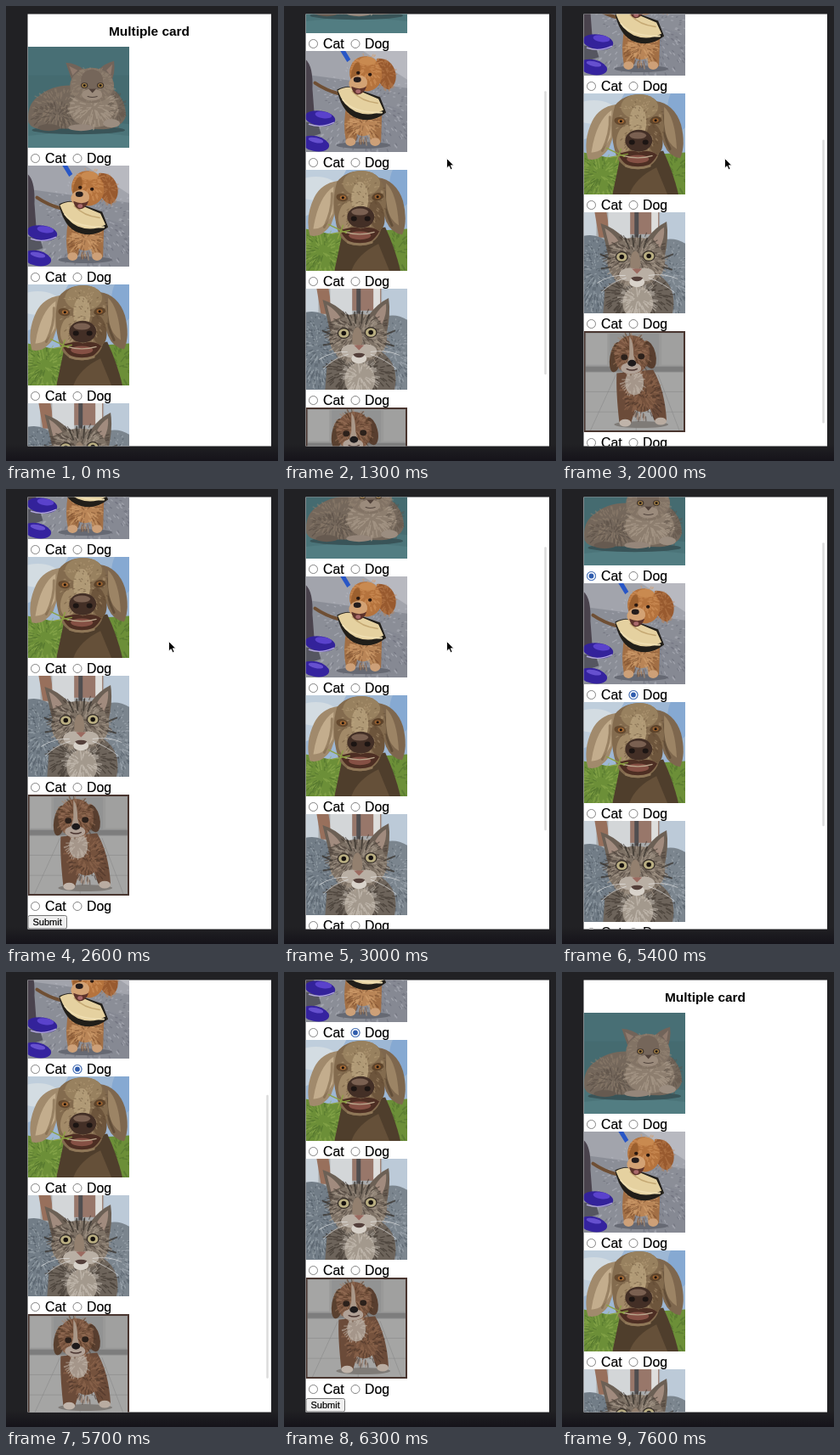
Recreate the animation shown at these times as an HTML page. Size 320x536 px, loop 8200 ms.

```html
<!DOCTYPE html>
<html lang="en">
<head>
<meta charset="utf-8">
<title>Multiple card</title>
<style>
html, body { margin: 0; width: 100%; height: 100%; overflow: hidden; background: #212124; }
svg { display: block; }
text { font-family: "Liberation Sans", Arial, sans-serif; font-size: 15.8px; fill: #000; stroke: #000; stroke-width: .2px; }
</style>
</head>
<body>
<svg id="stage" width="320" height="536" viewBox="0 0 320 536"></svg>
<script>
let seed = 7;
const rnd = () => (seed = (seed * 16807) % 2147483647) / 2147483647;

const E = (x, y, rx, ry, fill, turn = 0) =>
  `<ellipse cx="${x}" cy="${y}" rx="${rx}" ry="${ry}" fill="${fill}" transform="rotate(${turn} ${x} ${y})"/>`;
const P = (d, fill) => `<path d="${d}" fill="${fill}"/>`;
const L = (d, color, w = 1, o = 1) =>
  `<path d="${d}" fill="none" stroke="${color}" stroke-width="${w}" stroke-linecap="round" opacity="${o}"/>`;
const R = (x, y, w, h, fill) => `<rect x="${x}" y="${y}" width="${w}" height="${h}" fill="${fill}"/>`;

// Short strokes pointing away from the middle of an ellipse
function fur(cx, cy, rx, ry, n, len, color, o = .5) {
  let d = "";
  for (let i = 0; i < n; i++) {
    const a = rnd() * Math.PI * 2, r = Math.sqrt(rnd());
    const x = cx + Math.cos(a) * r * rx, y = cy + Math.sin(a) * r * ry;
    d += `M${x.toFixed(1)} ${y.toFixed(1)}l${(Math.cos(a) * len).toFixed(1)} ${(Math.sin(a) * len + 1).toFixed(1)}`;
  }
  return L(d, color, 1.3, o);
}
const eye = (x, y, r, iris, pupil) => E(x, y, r, r * .85, iris) + E(x, y, pupil, pupil, "#17120f");

const photos = [
  () => // long-haired cat on teal
    R(0, 0, 120, 120, "#456b70") + R(0, 0, 120, 34, "#486f75") +
    P("M0 90Q60 84 120 92V120H0Z", "#4b7479") + P("M0 106Q60 98 120 106V120H0Z", "#527d82") +
    E(60, 99, 55, 5, "#395458") +
    P("M1 90Q-2 68 14 58Q28 46 50 46L100 50Q116 62 116 82Q112 97 90 98L24 97Q6 100 1 90Z", "#74675b") +
    fur(38, 72, 34, 20, 130, 4, "#918171") + fur(36, 82, 32, 14, 90, 4, "#50463f") +
    E(78, 74, 29, 22, "#8d7e6f") + fur(78, 72, 27, 22, 130, 5, "#b0a08f", .6) + fur(106, 74, 8, 18, 40, 4, "#5d5147") +
    P("M53 42L45 19Q58 20 66 27H84Q91 20 102 17Q104 32 98 43Z", "#72645a") +
    P("M53 34L49 23L59 28ZM93 28L100 21L98 34Z", "#8f7a6d") +
    E(76, 46, 26, 21, "#827365") + fur(76, 45, 26, 20, 120, 3, "#9a8a79") +
    E(76, 40, 13, 13, "#75665a") + E(76, 57, 12, 7, "#9b8b7c") +
    E(67, 46, 4.2, 3.4, "#3f342d") + E(86, 46, 4.2, 3.4, "#3f342d") +
    eye(67, 46, 3, "#a07d45", 1.5) + eye(86, 46, 3, "#a07d45", 1.5) +
    P("M72 50h9l-4.500 5z", "#4f4039") + L("M71 59q5 2 11 0", "#51443d", 1.2) +
    E(63, 96, 15, 4, "#95867a") + E(99, 91, 10, 5, "#9b8d80") + E(25, 96, 13, 4, "#665a50"),

  () => // golden puppy with a cream scarf
    R(0, 0, 120, 120, "#8b8e97") + P("M0 0H120V44L0 28Z", "#a2a4ac") + P("M68 0H120V34Z", "#b8b9c0") +
    P("M90 62L120 72V120H70Z", "#868993") + fur(70, 70, 60, 55, 150, 2, "#bdbfc7", .45) +
    fur(70, 80, 60, 42, 120, 2, "#5f636f", .45) +
    P("M0 10Q9 18 8 45L10 72L0 76Z", "#4a434d") + P("M0 84L15 88L18 98L0 104Z", "#555660") +
    E(17, 80, 18, 9, "#33229a", 8) + E(21, 76, 10, 4, "#5a42cc", 8) + L("M4 87Q18 92 33 85", "#b4a8e0", 1.4) +
    E(11, 110, 17, 9, "#35239f", 12) + E(12, 106, 9, 3, "#6650cf", 12) +
    P("M41 0H47L53 10L49 13Z", "#2856c6") +
    L("M11 38Q24 47 40 51", "#6f4f34", 4) +
    E(68, 112, 32, 4, "#666973") +
    P("M49 60Q43 88 48 109Q54 114 59 107L63 90L74 91L77 109Q84 115 89 108L90 76L84 58Z", "#a26f45") +
    E(68, 82, 16, 19, "#b98557") + fur(68, 86, 18, 22, 100, 4, "#dbab78") + fur(68, 88, 18, 20, 50, 4, "#714526") +
    E(53, 108, 6, 5, "#cda078") + E(82, 108, 6, 5, "#cda078") +
    P("M37 46Q48 40 58 44L88 55L95 73Q76 88 56 78Q42 70 37 46Z", "#211e19") +
    P("M38 47Q50 40 60 46L86 57L92 70Q76 79 59 72Q44 65 38 47Z", "#e5d1a0") +
    L("M44 58Q56 74 90 73", "#f0dfb3", 2) + L("M55 48Q66 60 85 62", "#c4a873", 1.5) +
    P("M84 9Q101 8 106 25Q109 39 98 46Q87 43 82 26Z", "#985a2f") + fur(96, 28, 8, 16, 40, 4, "#be8050") +
    E(71, 27, 19, 21, "#b5733d", -18) + fur(73, 22, 17, 18, 100, 3, "#d89a62") +
    E(59, 26, 5, 13, "#9c602f", 12) + E(62, 38, 11, 9, "#d3a274", -14) + E(73, 12, 10, 5, "#c98a50") +
    E(62, 26, 2.2, 2, "#271710") + E(76, 28, 2.2, 2, "#271710") +
    E(61, 34, 4.5, 3.2, "#241c1c") + P("M54 42Q64 47 72 42Q69 51 61 52Q55 50 54 42Z", "#5d332b") +
    E(62, 48, 3, 2.4, "#a9696b"),

  () => // grey hound over grass
    R(0, 0, 120, 120, "#9db7d4") + P("M0 0H48L26 42L0 55Z", "#bfcedc") + E(12, 22, 26, 14, "#d3dce2") +
    E(113, 18, 14, 26, "#86a9d2") + P("M0 70L28 76L120 70V120H0Z", "#6c8f38") +
    fur(20, 98, 25, 24, 100, 5, "#93b152") + fur(108, 98, 14, 24, 50, 5, "#4a6a2a") + fur(22, 98, 26, 24, 60, 5, "#476829") +
    P("M34 120L43 77L94 68Q106 94 112 120Z", "#4f3e2c") + P("M54 120Q61 100 86 88L99 120Z", "#655039") +
    P("M38 13Q18 16 10 33Q-1 56 5 78Q18 82 30 65L40 36Z", "#a18a6c") +
    P("M33 20Q15 32 9 70Q22 71 32 52Z", "#c3ad8d") + L("M31 28Q32 48 22 68", "#7b6448", 3, .6) +
    P("M85 9Q107 12 115 37Q121 61 114 77Q101 75 95 61L85 30Z", "#7e674e") +
    P("M95 16Q108 28 110 66Q100 60 95 44Z", "#9c8465") + L("M93 26Q93 48 102 66", "#513f2c", 3, .6) +
    P("M37 14Q50-2 74 2Q92 7 94 29Q97 48 90 66Q87 87 66 90Q44 91 38 72Q29 42 37 14Z", "#836b4e") +
    E(66, 16, 22, 15, "#98815f") + E(49, 54, 10, 17, "#a28a68", 12) + E(84, 54, 9, 18, "#6d553c", -10) +
    E(64, 34, 10, 20, "#b09a76") + fur(65, 39, 27, 35, 90, 2, "#c0a982", .4) + fur(70, 42, 26, 38, 60, 2, "#5a452f", .4) +
    E(43, 33, 7, 4.5, "#64492f", 12) + E(85, 32, 7, 4.5, "#5c432b", -12) +
    E(44, 33, 3.6, 2.5, "#a96c35") + E(85, 32, 3.6, 2.5, "#9a612f") + E(44, 33, 1.6, 1.6, "#17120f") + E(85, 32, 1.6, 1.6, "#17120f") +
    E(65, 56, 16, 13, "#432f26") + E(64, 50, 10, 4, "#7a6051") + E(57, 58, 3.5, 3, "#1c1513") + E(73, 58, 3.5, 3, "#1c1513") +
    P("M41 72Q57 66 65 70Q78 66 87 73Q79 88 64 89Q47 87 41 72Z", "#4d2e23") +
    E(64, 78, 13, 5, "#855044") + L("M47 74Q64 79 81 74", "#b9a58b", 1.2) + L("M50 86Q64 91 78 86", "#8f7758", 3) +
    L("M27 65L48 75M31 76L52 72M38 82L44 66", "#8ca143", 1.4),

  () => // tabby on a blue-grey couch
    R(0, 0, 120, 120, "#a9acae") + R(0, 0, 15, 32, "#c9d2da") + P("M13 0H27L32 30H18Z", "#98705c") +
    R(29, 0, 26, 40, "#d3d6d8") + R(55, 0, 34, 26, "#98776a") + R(60, 0, 5, 30, "#504e50") +
    R(80, 0, 8, 30, "#dededc") + R(90, 0, 30, 55, "#bccad8") +
    P("M0 28Q18 24 32 39L42 120H0Z", "#727d87") + P("M88 36Q103 27 120 37V120H85Z", "#7b858e") +
    fur(13, 74, 19, 43, 130, 2, "#a3adb5", .6) + fur(106, 79, 16, 42, 110, 2, "#a5aeb6", .6) +
    fur(14, 74, 19, 43, 130, 2, "#4b5560", .6) + fur(106, 79, 16, 42, 80, 2, "#525c66", .6) +
    P("M25 92Q35 75 90 75Q111 90 105 120H23Z", "#6d645b") + fur(64, 99, 40, 22, 150, 5, "#3c342d", .6) +
    E(64, 108, 18, 20, "#a3998d") + fur(64, 104, 20, 18, 80, 5, "#d8d0c6") +
    P("M29 51L20 13Q36 18 48 31H75Q84 18 98 11Q101 30 95 56Z", "#6c6055") +
    P("M30 39L25 19Q35 25 41 34ZM82 32Q88 22 95 18Q96 31 90 42Z", "#a18b7e") +
    E(62, 59, 34, 29, "#7d7165") + fur(62, 59, 34, 29, 200, 4, "#afa293", .6) + fur(62, 52, 36, 27, 130, 4, "#433a32", .6) +
    L("M49 31L54 43M58 28L59 41M67 28L66 41M75 31L71 42M31 55L20 50M32 65L21 67M93 55L105 50M94 65L104 68", "#342e29", 2, .7) +
    E(61, 60, 6, 14, "#93806f") + E(54, 74, 12, 8, "#b9afa4") + E(72, 74, 12, 8, "#b9afa4") + E(63, 83, 9, 6, "#d8d2ca") +
    E(45, 53, 7.5, 6.5, "#332c27") + E(77, 52, 7.5, 6.5, "#332c27") +
    eye(45, 53, 6.2, "#b9ae82", 2.8) + eye(77, 52, 6.2, "#b9ae82", 2.8) +
    P("M57 67H69L63 73Z", "#9b6a60") + P("M56 78Q63 75 70 78Q68 82 63 82Q58 82 56 78Z", "#54403b") +
    L("M49 75Q31 74 16 84M50 78Q34 82 21 95M77 75Q95 72 111 79M77 78Q94 84 107 95", "#eee", .8, .75),

  () => // small brown and white puppy on tiles
    R(0, 0, 120, 120, "#8c8c8c") + R(2, 2, 116, 45, "#999998") + R(3, 3, 25, 37, "#a5a5a4") +
    R(31, 3, 58, 38, "#929393") + R(92, 3, 25, 37, "#a0a09f") + R(2, 42, 116, 6, "#7d7d7d") +
    P("M2 49H118V118H2Z", "#a5a5a4") +
    L("M2 72H118M2 96H118M38 52L8 118M62 52V118M88 52L113 118", "#898a89", 1, .6) +
    E(68, 111, 32, 4, "#7f7b77") +
    P("M39 50Q38 72 42 108Q48 114 56 109L61 92L78 91L84 107Q92 112 98 107Q96 70 82 46Z", "#6b4b39") +
    E(69, 72, 18, 24, "#75523d") + fur(68, 74, 22, 27, 130, 4, "#976f54") + fur(72, 82, 20, 22, 70, 4, "#412d23") +
    E(60, 61, 11, 15, "#a5968a") + fur(58, 60, 12, 13, 50, 4, "#cabfb4") +
    E(49, 109, 7, 4.5, "#c0b4aa") + E(91, 107, 7, 4.5, "#b9aca1") +
    E(38, 31, 7, 18, "#59402f", 10) + E(77, 28, 8, 17, "#583e2f", -14) +
    E(57, 28, 21, 23, "#795540") + fur(57, 26, 21, 22, 120, 4, "#a37d60") + fur(57, 26, 21, 22, 60, 4, "#48301f") +
    P("M54 6Q59 12 59 29L63 43Q58 49 50 43L54 28Z", "#a99788") + E(56, 44, 12, 7, "#b0a196") +
    E(48, 31, 4, 3.5, "#2c211b") + E(68, 30, 4, 3.5, "#2c211b") +
    E(57, 38, 5, 4, "#1d1a1b") + L("M51 45Q57 48 63 45", "#4a3530", 1.5) +
    `<rect x="1" y="1" width="118" height="118" fill="none" stroke="#49352f" stroke-width="2"/>`
];

function radio(name, x, y) {
  return `<circle cx="${x}" cy="${y}" r="5" fill="#fff" stroke="#767676" stroke-width=".9"/>
    <g id="${name}" visibility="hidden"><circle cx="${x}" cy="${y}" r="5" fill="#fff" stroke="#4a75bd" stroke-width="1.1"/>
    <circle cx="${x}" cy="${y}" r="2.900" fill="#2f5cad"/></g>`;
}

function card(photo, i) {
  const y = 48 + i * 140;
  return `<svg x="25.500" y="${y}" width="119.500" height="119" viewBox="0 0 120 120" preserveAspectRatio="none">
    <g filter="url(#soft)">${photo()}</g></svg>
    ${radio("cat" + i, 34.5, y + 131.5)}<text x="46" y="${y + 136.6}">Cat</text>
    ${radio("dog" + i, 84, y + 131.5)}<text x="95" y="${y + 136.6}">Dog</text>`;
}

const $ = id => document.getElementById(id);
$("stage").innerHTML = `
  <defs>
    <clipPath id="page"><rect x="25.500" y="9.500" width="286.500" height="509"/></clipPath>
    <filter id="soft" x="0" y="0" width="1" height="1"><feGaussianBlur stdDeviation=".8"/></filter>
    <linearGradient id="base" x2="0" y2="1"><stop stop-color="#212124"/><stop offset="1" stop-color="#15131a"/></linearGradient>
  </defs>
  ${R(0, 0, 320, 536, "#212124")}${R(0, 516, 320, 20, "url(#base)")}
  ${R(25.5, 9.5, 286.5, 509, "#fff")}
  <g clip-path="url(#page)">
    <g id="scroll">
      <text x="168.500" y="34.500" text-anchor="middle" style="font-weight:bold;font-size:15.400px;stroke:none">Multiple card</text>
      ${photos.map(card).join("")}
      <rect x="26" y="750.500" width="45.500" height="15.500" rx="2" fill="#efefef" stroke="#767676"/>
      <text x="31.500" y="762" style="font-size:11px">Submit</text>
    </g>
    <rect id="bar" x="306.300" width="2.500" height="334" rx="1.200" fill="#dcdcdc"/>
    <path id="cursor" d="M0 0V11.500L2.700 9L4.600 13.200L6.500 12.300L4.700 8.300H8.200Z" fill="#000" stroke="#fff" stroke-width=".8"/>
  </g>`;

// Keys are [time, value]
const scrollKeys = [[900, 0], [1000, 8], [1100, 40], [1300, 135], [1400, 162], [1600, 182], [1700, 182],
  [1800, 190], [2000, 225], [2300, 248], [2600, 248], [2700, 236], [2900, 130], [3100, 40], [3300, 6],
  [3500, 0], [5200, 0], [5300, 22], [5400, 77], [5600, 178], [5800, 232], [6000, 248], [6900, 248], [7000, 0]];
const barKeys = [[900, 0], [1000, 1], [2400, 1], [2600, 0], [2700, 1], [3300, 1], [3500, 0],
  [5200, 0], [5300, 1], [5900, 1], [6100, 0]];

function at(keys, t) {
  const i = keys.findIndex(k => k[0] > t);
  if (i < 0) return keys[keys.length - 1][1];
  if (!i) return keys[0][1];
  const [t0, a] = keys[i - 1], [t1, b] = keys[i];
  return a + (b - a) * (t - t0) / (t1 - t0);
}
const show = (id, on) => $(id).setAttribute("visibility", on ? "visible" : "hidden");

const start = performance.now();
function draw() {
  const t = Math.floor(Math.max(0, performance.now() - start) % 8200 / 100) * 100;
  const y = at(scrollKeys, t);
  $("scroll").setAttribute("transform", `translate(0 ${-y})`);
  $("bar").setAttribute("y", 14 + y * .638);
  $("bar").setAttribute("opacity", at(barKeys, t));
  show("cat0", t >= 4200 && t < 7000);
  show("dog1", t >= 5000 && t < 7000);
  const rest = Math.pow(1 - Math.min(1, t / 800), 2);
  $("cursor").setAttribute("transform", `translate(${191.5 + 9 * rest} ${179.5 + 340 * rest})`);
  show("cursor", t >= 100 && t < 3400);
  requestAnimationFrame(draw);
}
draw();
</script>
</body>
</html>
```
